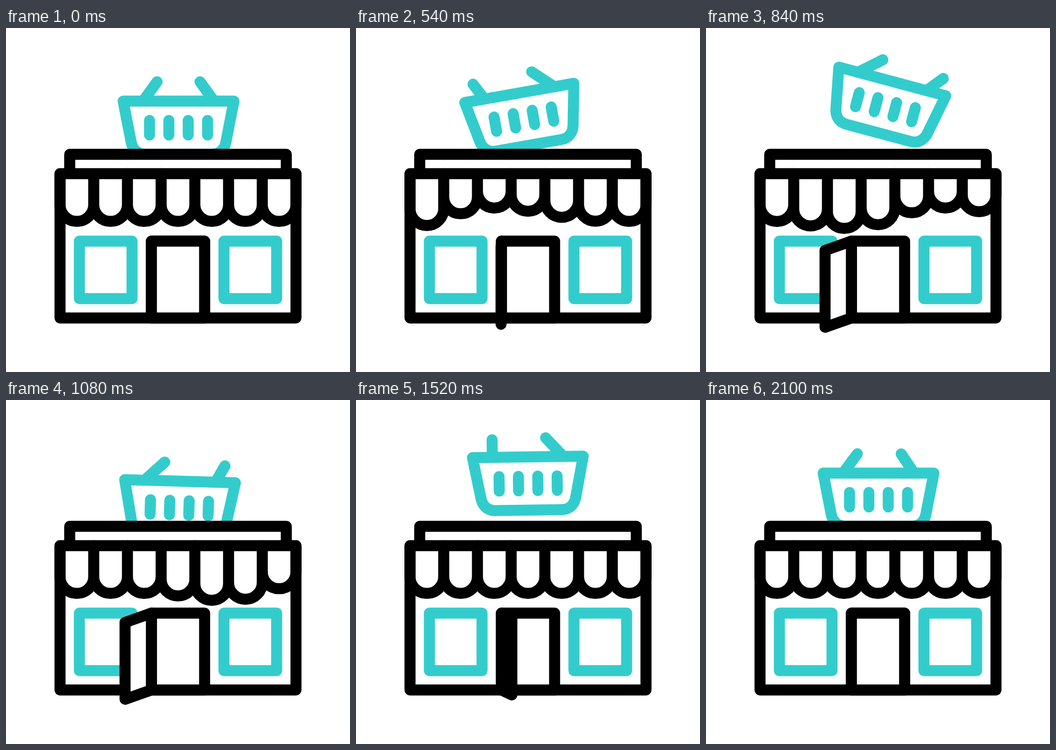
An HTML page that plays this animation: 640 px wide and 640 px high, repeating every 2400 ms.

```html
<!DOCTYPE html>
<html lang="en">
<head>
<meta charset="utf-8">
<title>Shop</title>
<style>
html, body { margin: 0; height: 100%; overflow: hidden; background: #fff; }
svg { display: block; width: 100vw; height: 100vh; }
svg * { stroke-width: 20.5; stroke-linejoin: round; stroke-linecap: round; }
.ink { stroke: #000; fill: #fff; }
.teal { stroke: #33cccc; fill: none; }
.line { fill: none; }
</style>
</head>
<body>
<svg viewBox="0 0 640 640">
  <g id="basket" class="teal">
    <path id="handles"/>
    <path d="M218 136H424L409 213C406 227 396 235 383 235H259C246 235 236 227 233 213Z"/>
    <path d="M267 172v27m36-27v27m36-27v27m36-27v27"/>
  </g>
  <path class="ink" d="M118.500 271V235H521.500V271"/>
  <path class="ink" d="M100.500 271H539.500V539.500H100.500Z"/>
  <path class="teal" d="M136.500 396.500h98v107h-98zM405.500 396.500h98v107h-98z"/>
  <path id="awning" class="ink line"/>
  <path class="ink" d="M270.500 539.500V396.500H369.500V539.500Z"/>
  <path id="door" class="ink"/>
</svg>
<script>
const LOOP = 2400;
const $ = id => document.getElementById(id);

// Eased step from 0 to 1 between times a and b
function ease(t, a, b) {
  const u = Math.min(1, Math.max(0, (t - a) / (b - a)));
  return (1 - Math.cos(Math.PI * u)) / 2;
}

// Smooth bump from 0 to 1 and back
function hop(t, start) {
  const u = (t - start) / 670;
  return u > 0 && u < 1 ? Math.sin(Math.PI * u) ** 2 : 0;
}

function tilt(t) {
  return -10 * ease(t, 0, 220) + 25 * ease(t, 540, 800) - 23 * ease(t, 860, 1260)
    + 12 * ease(t, 1340, 1660) - 4 * ease(t, 1740, 2080);
}

function lift(t) {
  const crouch = ease(t, 0, 220) - ease(t, 1755, 2080);
  return 15 * crouch - 75 * hop(t, 390) - 57 * hop(t, 1085);
}

// side is -1 for the left handle, 1 for the right; the outward swing is wider
function handle(side, swing) {
  const shift = swing * side > 0 ? swing : swing * 0.25;
  return `M${321 + side * 66} 136L${321 + side * 40 + shift} ${100 + Math.abs(shift) * 0.12}`;
}

function drawBasket(t) {
  const swing = 4.2 * tilt(t - 100);
  $("basket").setAttribute("transform", `translate(0 ${lift(t)}) rotate(${tilt(t)} 321 235)`);
  $("handles").setAttribute("d", handle(-1, swing) + handle(1, swing));
}

function flap(t) {
  return -25 * ease(t, 0, 345) + 38 * ease(t, 345, 605) - 13 * ease(t, 660, 850);
}

function drawAwning(t) {
  const w = 439 / 7, r = w / 2;
  let d = "";
  for (let i = 0; i < 7; i++) {
    const y = 328.5 + flap(t - i * 103);
    d += `M${100.5 + i * w} 271V${y}a${r} ${r} 0 0 0 ${w} 0V271`;
  }
  $("awning").setAttribute("d", d);
}

function drawDoor(t) {
  const swing = 148 * (ease(t, 155, 785) - ease(t, 1240, 1830));
  const x = 369.5 - swing, drop = swing * 0.117;
  $("door").setAttribute("d",
    `M270.5 396.5L${x} ${396.5 + drop}V${539.5 + drop}L270.5 539.5Z`);
}

const start = performance.now();
function frame() {
  const t = (performance.now() - start) % LOOP;
  drawBasket(t);
  drawAwning(t);
  drawDoor(t);
  requestAnimationFrame(frame);
}
frame();
</script>
</body>
</html>
```
